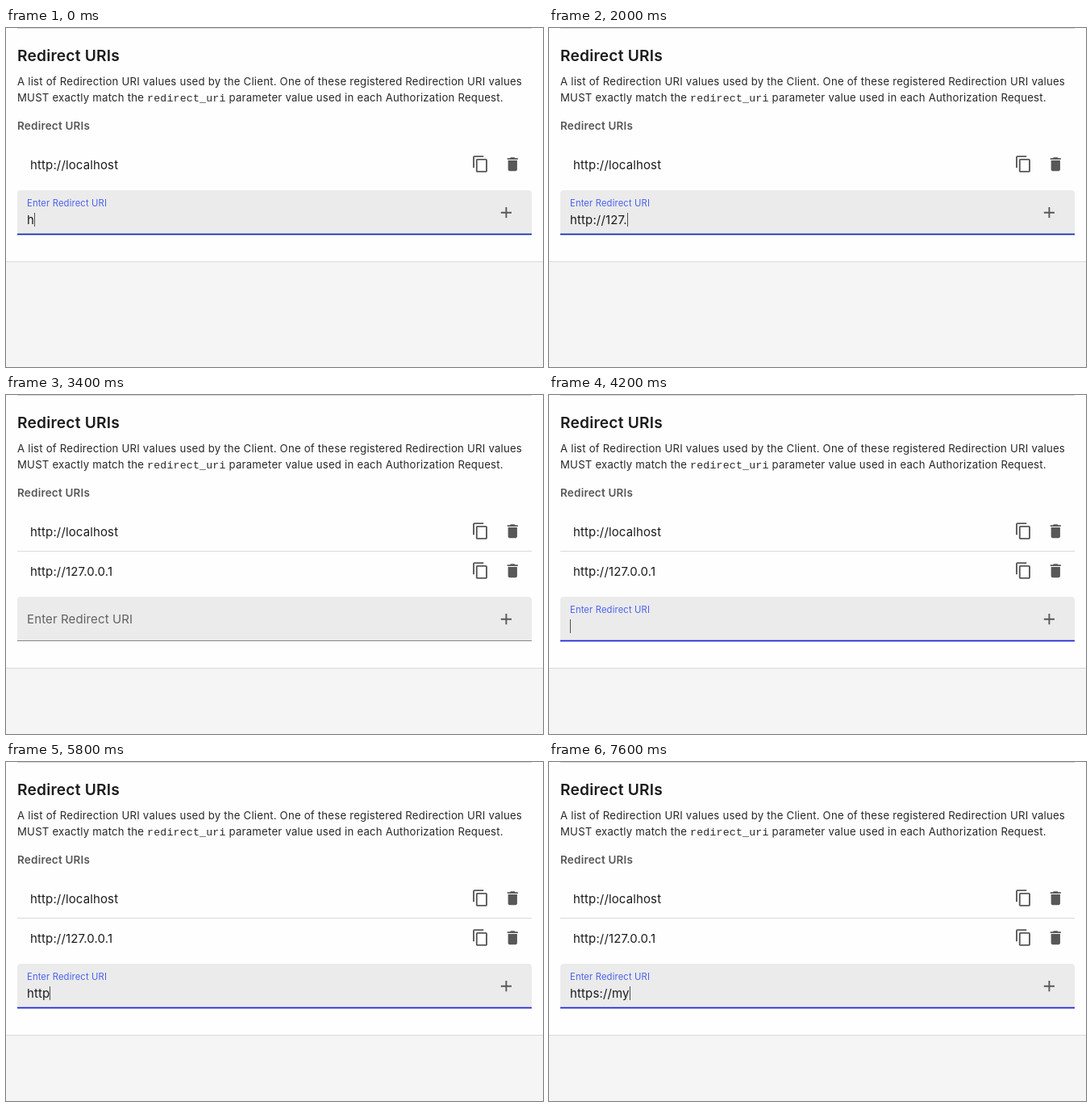
An HTML page for the animation above (8000 ms loop, 666 by 420 pixels).

```html
<!DOCTYPE html>
<html lang="en">
<head>
<meta charset="utf-8">
<title>Redirect URIs</title>
<style>
  html, body { margin: 0; width: 100%; height: 100%; overflow: hidden; background: #f5f5f5; }
  svg { display: block; font-family: Inter, sans-serif; }
  text { white-space: pre; fill: #1c1c1e; }
  .heading { font-size: 19.2px; font-weight: 600; letter-spacing: .2px; }
  .body { font-size: 13.2px; letter-spacing: .21px; fill: #28282a; }
  .mono { font-family: "Liberation Mono", monospace; }
  .subheading { font-size: 13.5px; font-weight: 600; letter-spacing: .2px; fill: #575757; }
  .value { font-size: 15px; letter-spacing: .13px; }
  #restLabel { fill: #626262; }
  #floatLabel { font-size: 11.25px; letter-spacing: .13px; fill: #4a62ee; }
  .icon { fill: #585858; }
</style>
</head>
<body>
<svg width="666" height="420" viewBox="0 0 666 420">
  <defs>
    <g id="rowIcons" class="icon">
      <path transform="translate(588 168.5) scale(.94) translate(-11.5 -12)" d="M16 1H4c-1.1 0-2 .9-2 2v14h2V3h12V1zm3 4H8c-1.1 0-2 .9-2 2v14c0 1.1.9 2 2 2h11c1.1 0 2-.9 2-2V7c0-1.1-.9-2-2-2zm0 16H8V7h11v14z"/>
      <path transform="translate(628.3 168.7) scale(.94) translate(-12 -12)" d="M6 19c0 1.1.9 2 2 2h8c1.1 0 2-.9 2-2V7H6v12zM19 4h-3.5l-1-1h-5l-1 1H5v2h14V4z"/>
    </g>
  </defs>

  <rect width="666" height="420" fill="#f5f5f5"/>
  <rect id="card" width="666" fill="#fefefe"/>
  <rect x="14" width="638" height="1" fill="#d6d6e4"/>

  <text class="heading" x="14" y="41">Redirect URIs</text>
  <text class="body" x="14" y="71">A list of Redirection URI values used by the Client. One of these registered Redirection URI values</text>
  <text class="body" x="14" y="91">MUST exactly match the <tspan class="mono">redirect_uri</tspan> parameter value used in each Authorization Request.</text>
  <text class="subheading" x="14" y="126">Redirect URIs</text>

  <text class="value" x="30" y="175">http://localhost</text>
  <use href="#rowIcons"/>
  <g id="addedRow">
    <rect x="14" y="193" width="638" height="1" fill="#dadada"/>
    <text class="value" x="30" y="224">http://127.0.0.1</text>
    <use href="#rowIcons" y="49"/>
  </g>

  <g id="lower">
    <path d="M14 256V205a4 4 0 0 1 4-4H648a4 4 0 0 1 4 4V256z" fill="#ebebeb"/>
    <path class="icon" transform="translate(620.4 228.7) scale(.94) translate(-12 -12)" d="M19 13h-6v6h-2v-6H5v-2h6V5h2v6h6v2z"/>
    <g id="resting">
      <text id="restLabel" class="value" x="26" y="234">Enter Redirect URI</text>
      <rect x="14" y="255" width="638" height="1" fill="#878787"/>
    </g>
    <g id="focused">
      <text id="floatLabel" x="26" y="221">Enter Redirect URI</text>
      <text id="input" class="value" x="26" y="243"></text>
      <rect id="caret" y="229" width="1" height="17" fill="#505050"/>
      <rect id="underline" x="14" y="254.7" width="638" height="1.7"/>
    </g>
    <rect y="289" width="666" height="1" fill="#d9d9d9"/>
  </g>
</svg>
<script>
  const LOOP = 8000, STEP = 200, ROW_HEIGHT = 49;
  const ADD_AT = 3400, FOCUS_AT = 4200, RETYPE_AT = 5000, RESUME_AT = 7200;
  const FIRST_URI = "http://127.0.0.1", SCHEME = "https://", HOST = "my";
  const el = id => document.getElementById(id);
  const show = (id, visible) => el(id).setAttribute("visibility", visible ? "visible" : "hidden");

  // One character per step after the given start time.
  const typed = (text, t, start) => text.slice(0, Math.max(0, Math.floor((t - start) / STEP)));

  function render(t) {
    const added = t >= ADD_AT;
    const focused = !added || t >= FOCUS_AT;
    const shift = added ? ROW_HEIGHT : 0;

    el("card").setAttribute("height", 289 + shift);
    el("lower").setAttribute("transform", `translate(0 ${shift})`);
    show("addedRow", added);
    show("resting", !focused);
    show("focused", focused);

    const input = el("input");
    input.textContent = added
      ? typed(SCHEME, t, RETYPE_AT) + typed(HOST, t, RESUME_AT)
      : typed(FIRST_URI, t, -STEP);
    const width = input.textContent ? input.getComputedTextLength() : 0;
    el("caret").setAttribute("x", Math.round(26 + width));
    el("underline").setAttribute("fill", added ? "#1d20d8" : "#0a2aae");
  }

  const start = performance.now();
  function frame() {
    render((performance.now() - start) % LOOP);
    requestAnimationFrame(frame);
  }
  frame();
</script>
</body>
</html>
```
